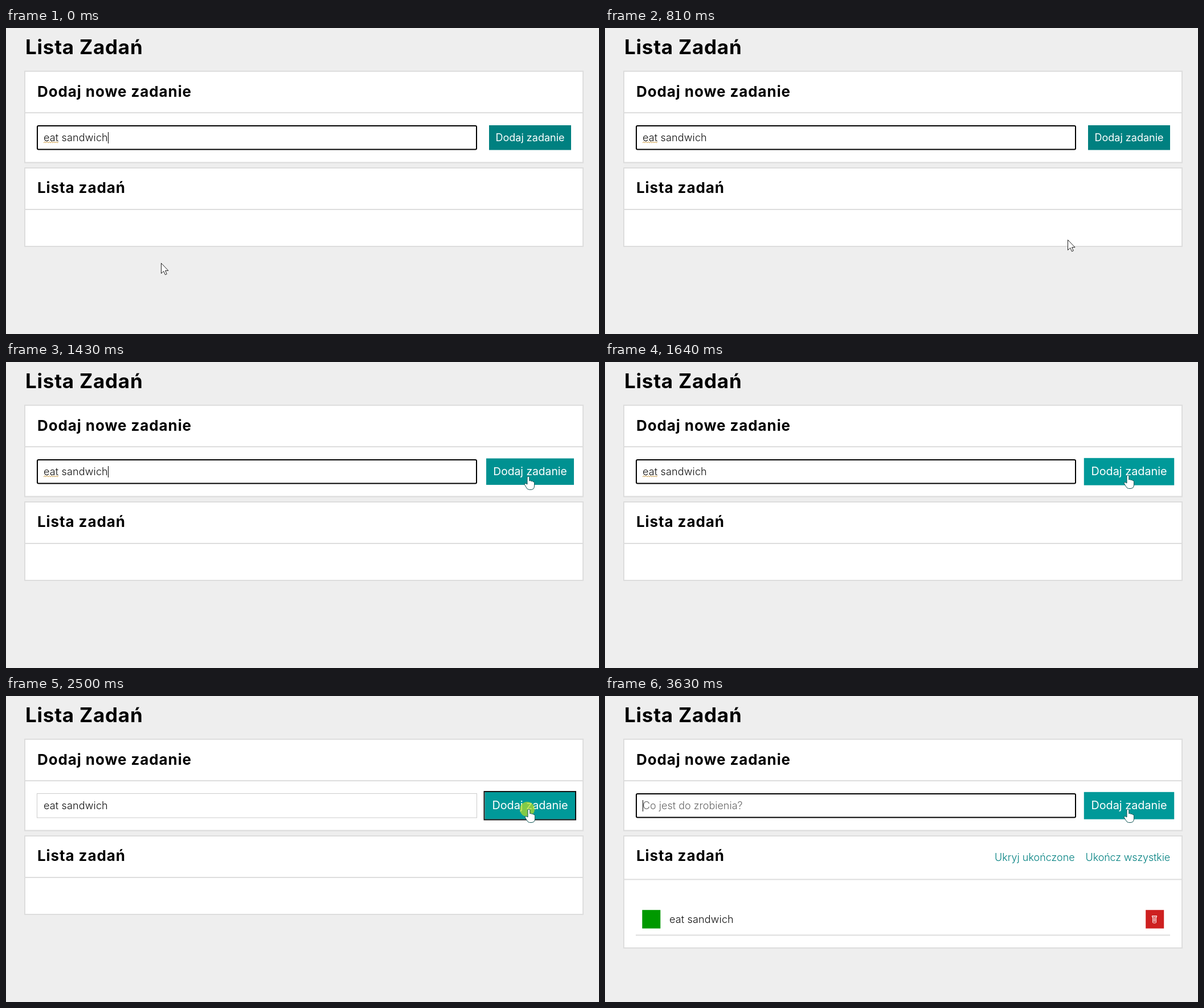
An HTML page that plays this animation: 1041 px wide and 538 px high, repeating every 3.89 s.

```html
<!DOCTYPE html>
<html lang="pl">
<head>
<meta charset="utf-8">
<title>Lista Zadań</title>
<style>
  html, body { margin: 0; height: 100%; overflow: hidden; background: #eee; }
  svg { display: block; width: 100%; height: 100%; }
  text { font: 400 18px Inter, "Open Sans", sans-serif; white-space: pre; }
  .head { font-weight: 700; font-size: 26px; letter-spacing: .9px; }
  .title { font-weight: 700; font-size: 35px; letter-spacing: .75px; }
  .thin { font-weight: 300; fill: #111; letter-spacing: .15px; }
  .card { fill: #fff; stroke: #ddd; stroke-width: 2; filter: drop-shadow(0 0 .6px #ddd); }
  .rule { stroke: #ddd; stroke-width: 2; }
  .link { font-weight: 300; fill: teal; }
  .hint { font-weight: 300; fill: #666; }
</style>
</head>
<body>
<svg viewBox="0 0 1041 538">
  <text class="title" x="34" y="46">Lista Zadań</text>

  <rect class="card" x="33" y="76" width="980" height="160.5"/>
  <path class="rule" d="M33 149H1013"/>
  <text class="head" x="55" y="121">Dodaj nowe zadanie</text>
  <rect id="field" fill="#fff"/>
  <text id="typed" class="thin" x="66" y="198.5">eat sandwich</text>
  <path id="wave" fill="none" stroke="#c8963c" d="M66 202l2-2 2 2 2-2 2 2 2-2 2 2 2-2 2 2 2-2 2 2 2-2 2 2 2-2"/>
  <text id="hint" class="hint" x="66" y="198.5">Co jest do zrobienia?</text>
  <path id="caret" stroke="#000"/>

  <rect id="card" class="card" x="33" y="246" width="980"/>
  <path id="rule" class="rule"/>
  <text class="head" x="55" y="290" letter-spacing=".5">Lista zadań</text>
  <g id="task">
    <text class="link" x="684" y="289.5">Ukryj ukończone</text>
    <text class="link" x="992" y="289.5" text-anchor="end" letter-spacing="-.15">Ukończ wszystkie</text>
    <rect x="65.3" y="376.2" width="32" height="32.5" fill="#090"/>
    <text class="thin" x="113" y="398.5">eat sandwich</text>
    <rect x="949.2" y="376.2" width="32" height="32.5" fill="#ce2020"/>
    <path fill="none" stroke="#fff" d="M960.5 388.5v-2h8v2zM961.5 388.5v9.5l1 1h4l1-1v-9.5M963.5 390v7M965.5 390v7"/>
    <path class="rule" d="M54 420.5H992"/>
  </g>

  <g id="button">
    <rect x="848" y="171" width="144" height="43.5"/>
    <text x="920" y="198.5" text-anchor="middle" fill="#fff">Dodaj zadanie</text>
  </g>
  <g id="press">
    <rect x="839.5" y="168" width="160.5" height="49.5" fill="none" stroke="#111" stroke-width="2"/>
    <circle cx="915" cy="199" r="13" fill="#b4dc28" fill-opacity=".72"/>
  </g>

  <path id="arrow" fill="#fff" stroke="#222" d="M.5.5V18.5L4.8 14.6 7.5 20.8 10.3 19.6 7.6 13.6H13z"/>
  <path id="hand" fill="#fff" stroke="#155" d="M-2 1Q0-1 1.8 1V8Q4 6.5 5 8.5 7 7.5 8 9.5 10.5 9 10.5 11.5V17Q10.5 23.5 4 23.5H1.5Q-2 23.5-4 19L-7 14Q-6 11-2 14z"/>
</svg>
<script>
const LOOP = 3890, START = 400, TICK = 68.6, CLICK = 2500, ADDED = 2570;
const blinks = [540, 1080, 1570, 2110, 3130, 3630];
// Pointer path: tick, x, y
const path = [[-1, 272, 413], [0, 285, 415], [2, 440, 414], [4, 640, 402], [6, 812, 372], [7, 860, 328],
  [8, 880, 298], [10, 896, 258], [12, 905, 226], [13, 910, 216], [14, 914, 206], [15, 917, 201], [16, 918, 199]];

const $ = id => document.getElementById(id);
const show = (id, on) => $(id).style.display = on ? "" : "none";
const set = (id, attrs) => {
  for (const name in attrs) $(id).setAttribute(name, attrs[name]);
};

function pointerAt(tick) {
  const i = path.findIndex(p => p[0] >= tick);
  if (i < 0) return path.at(-1).slice(1);
  if (!i) return path[0].slice(1);
  const a = path[i - 1], b = path[i], f = (tick - a[0]) / (b[0] - a[0]);
  return [1, 2].map(n => Math.round(a[n] + (b[n] - a[n]) * f));
}

function draw(t) {
  const tick = Math.max(-1, Math.floor((t - START) / TICK + .05));
  const added = t >= ADDED, focused = t < CLICK || added;

  set("field", focused
    ? { x: 55, y: 172, width: 771, height: 41.5, rx: 2, stroke: "#000", "stroke-width": 2 }
    : { x: 54.5, y: 171.5, width: 772, height: 42.5, rx: 0, stroke: "#ccc", "stroke-width": 1 });
  show("typed", !added);
  show("wave", t < CLICK);
  show("hint", added);
  show("caret", focused && blinks.filter(b => b <= t).length % 2 == 0);
  set("caret", { d: `M${added ? 66.5 : 179.5} 183v20` });

  show("task", added);
  set("card", { height: added ? 197 : 138 });
  set("rule", { d: `M33 ${added ? 322.5 : 319}H1013` });

  const p = Math.min(1, Math.max(0, (START + tick * TICK - 1340) / 200));
  const hover = 1 - (1 - p) ** 2;
  set("button", {
    transform: `translate(920 192.75) scale(${1 + .1 * hover}) translate(-920 -192.75)`,
    fill: `rgb(0 ${128 + 25 * hover} ${128 + 25 * hover})`
  });
  show("press", t >= CLICK && !added);

  const move = { transform: `translate(${pointerAt(tick)})` };
  set("arrow", move);
  set("hand", move);
  show("arrow", tick < 14);
  show("hand", tick >= 14);
}

const begin = performance.now();
function frame() {
  draw((performance.now() - begin) % LOOP);
  requestAnimationFrame(frame);
}
frame();
</script>
</body>
</html>
```
